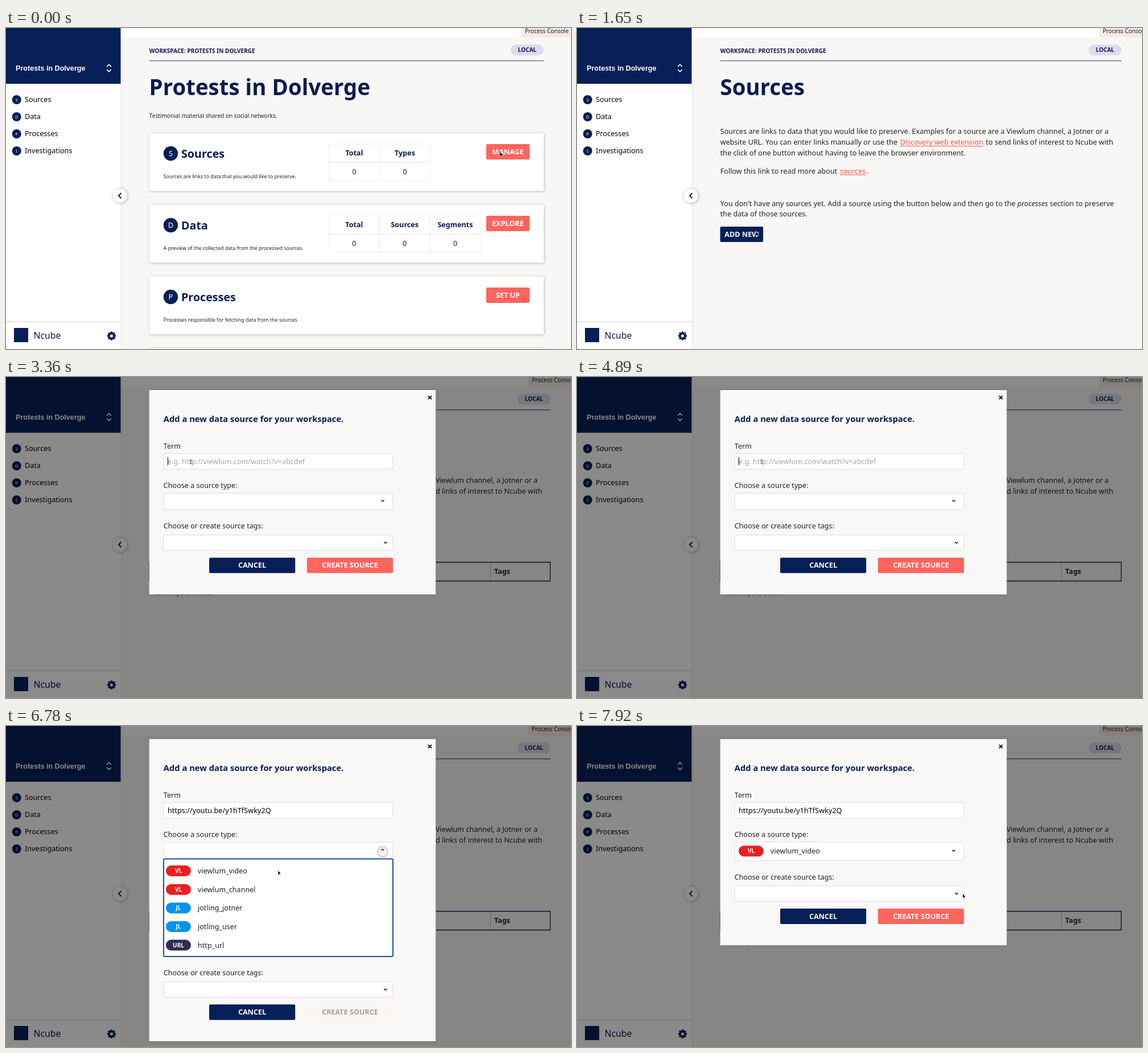
Animation, 993 px wide and 564 px high, one loop 8000 ms. Source, as an HTML page with a canvas:

```html
<!DOCTYPE html>
<html lang="en">
<head>
<meta charset="utf-8">
<title>Workspace</title>
<style>
html, body { margin: 0; width: 100%; height: 100%; overflow: hidden; background: #f9f7f5; }
canvas { display: block; width: 993px; height: 564px; }
</style>
</head>
<body>
<canvas id="stage"></canvas>
<script>
const W = 993, H = 564, LOOP = 8000;
const NAVY = '#071f57', INK = '#0b1b52', RED = '#ff645d', PAGE = '#f9f7f5', BODY = '#222226';
const SANS = '"Noto Sans", sans-serif', ARIAL = '"Liberation Sans", Arial, sans-serif';
const REM = 12.6, SMALL = 10.08, TINY = 8.82;

// moments of the story, in ms
const T = { sources: 840, modal: 1800, paste: 5220, open: 6420, pick: 7230 };
const CLICKS = [[800, 868, 219], [1690, 314, 359], [3300, 325, 149], [6390, 662, 221], [7170, 406, 268]];
const CARET = [[3300, 3540], [3990, 4440], [4890, 5220], [5220, 5700]];
const PATH = [
  [0, 868, 217], [1020, 868, 217], [1590, 314, 357], [1800, 314, 357], [2000, 310, 356],
  [2460, 310, 356], [2970, 362, 186], [3120, 362, 186], [3300, 325, 149], [5400, 325, 149],
  [6180, 661, 219], [6450, 661, 219], [6960, 406, 268], [7290, 406, 268],
  [7920, 678, 295], [LOOP, 678, 295]
];
const TYPES = [
  ['VL', '#ea2020', 'viewlum_video'], ['VL', '#ea2020', 'viewlum_channel'],
  ['JL', '#0792ec', 'jotling_jotner'], ['JL', '#0792ec', 'jotling_user'],
  ['URL', '#352a55', 'http_url']
];
const TITLE = 'Protests in Dolverge';
const LINK = 'https://youtu.be/y1hTfSwky2Q';

const canvas = document.getElementById('stage');
const ctx = canvas.getContext('2d');
const dpr = window.devicePixelRatio || 1;
canvas.width = W * dpr;
canvas.height = H * dpr;

// y is the middle of the capitals; returns the right end of the text
function text(str, x, y, size = REM, { color = BODY, style = '', align = 'left', font = SANS } = {}) {
  ctx.font = `${style} ${size}px ${font}`;
  ctx.textAlign = align;
  ctx.fillStyle = color;
  ctx.fillText(str, x, y + size * 0.357);
  return x + ctx.measureText(str).width;
}
const bold = (str, x, y, size, color = INK, align = 'left') =>
  text(str, x, y, size, { color, style: 'bold', align });

function rect(x, y, w, h, color) {
  ctx.fillStyle = color;
  ctx.fillRect(x, y, w, h);
}

function box(x, y, w, h, { r = 0, fill, stroke, line = 1, shadow }) {
  ctx.save();
  ctx.beginPath();
  ctx.roundRect(x, y, w, h, r);
  if (shadow) {
    ctx.shadowColor = shadow;
    ctx.shadowBlur = 5 * dpr;
    ctx.shadowOffsetX = dpr;
    ctx.shadowOffsetY = dpr;
  }
  if (fill) { ctx.fillStyle = fill; ctx.fill(); }
  ctx.shadowColor = 'transparent';
  if (stroke) { ctx.strokeStyle = stroke; ctx.lineWidth = line; ctx.stroke(); }
  ctx.restore();
}

function disc(x, y, r, color) {
  ctx.beginPath();
  ctx.arc(x, y, r, 0, Math.PI * 2);
  ctx.fillStyle = color;
  ctx.fill();
}

function lines(points, color, width) {
  ctx.beginPath();
  points.forEach(([x, y], i) => i ? ctx.lineTo(x, y) : ctx.moveTo(x, y));
  ctx.strokeStyle = color;
  ctx.lineWidth = width;
  ctx.stroke();
}

// dir 1 points down, -1 points up
const chevron = (x, y, dir, w = 2.6, color = INK, line = 1.5) =>
  lines([[x - w, y - dir * w / 2], [x, y + dir * w / 2], [x + w, y - dir * w / 2]], color, line);

function badge(letter, x, y, r, size) {
  disc(x, y, r, NAVY);
  text(letter, x, y, size, { color: '#fff', align: 'center' });
}

function button(label, x, y, w, h, fill, color = '#fff') {
  box(x, y, w, h, { r: 2, fill });
  bold(label, x + w / 2, y + h / 2, REM, color, 'center');
}

function pill(label, x, y, w, fill, color) {
  box(x, y - 9.5, w, 19, { r: 9.5, fill });
  bold(label, x + w / 2, y, SMALL, color, 'center');
}

function gear(x, y) {
  ctx.save();
  ctx.translate(x, y);
  for (let i = 0; i < 4; i++) {
    box(-1.8, -7.7, 3.6, 15.4, { r: 0.8, fill: NAVY });
    ctx.rotate(Math.PI / 4);
  }
  disc(0, 0, 5.9, NAVY);
  disc(0, 0, 2.6, '#fff');
  ctx.restore();
}

function sidebar() {
  box(0, 0, 201.5, H, { fill: '#fff', shadow: 'rgba(0,0,0,.06)' });
  rect(0, 0, 201.5, 98, NAVY);
  text(TITLE, 17, 70.3, REM, { color: '#fff', style: 'bold', font: ARIAL });
  chevron(181, 66, -1, 3.8, '#fff');
  chevron(181, 75, 1, 3.8, '#fff');
  ['Sources', 'Data', 'Processes', 'Investigations'].forEach((name, i) => {
    const y = 126 + i * 30;
    badge(name[0], 18.7, y, 8, 7.2);
    text(name, 33, y, REM, { color: '#000' });
  });
  rect(0, 515.5, 201.5, 1, '#cfcfd2');
  rect(14, 527, 25, 25, NAVY);
  text('Ncube', 48.5, 540, 15.75, { color: INK });
  gear(185.5, 541);
  box(187, 281.5, 26, 26, { r: 13, fill: '#fff', stroke: '#dedee0', shadow: 'rgba(0,0,0,.25)' });
  lines([[202.5, 290], [198, 294.6], [202.5, 299.2]], INK, 2);
}

function topBar(right) {
  rect(0, 0, W, H, PAGE);
  rect(201, 0, W, 16.5, '#fff');
  rect(right - 39, 0, W, 16.5, '#fae9e1');
  text('Process Console', right - 33, 5.3, SMALL, { color: INK });
  bold('WORKSPACE: ' + TITLE.toUpperCase(), 251.8, 40.7, SMALL);
  pill('LOCAL', right - 58, 38.7, 58, '#dcdcec', INK);
  rect(252, 57.2, right - 252, 1, '#28386c');
}

function card(y, name, note, action, columns, colW) {
  box(252, y, 693, 101, { fill: '#fff', shadow: 'rgba(0,0,0,.24)' });
  if (!name) return;
  badge(name[0], 289.5, y + 35.5, 12.7, 13);
  bold(name, 308, y + 36.3, 19.7);
  text(note, 276.8, y + 76, TINY);
  columns.forEach((head, i) => {
    const x = 567.5 + i * colW, mid = x + colW / 2;
    box(x, y + 19, colW, 32, { stroke: '#ececec' });
    box(x, y + 51, colW, 32, { stroke: '#ececec' });
    bold(head, mid, y + 35, REM, INK, 'center');
    text('0', mid, y + 67.5, REM, { color: INK, align: 'center' });
  });
  button(action, 844, y + 19, 76, 27, RED);
}

function dashboard() {
  topBar(945);
  bold(TITLE, 251.6, 104, 38.45);
  text('Testimonial material shared on social networks.', 251.8, 154.7, SMALL);
  card(185, 'Sources', 'Sources are links to data that you would like to preserve.', 'MANAGE', ['Total', 'Types'], 89);
  card(311, 'Data', 'A preview of the collected data from the processed sources.', 'EXPLORE', ['Total', 'Sources', 'Segments'], 88.8);
  card(437, 'Processes', 'Processes responsible for fetching data from the sources.', 'SET UP', []);
  card(563);
}

function linkText(str, x, y) {
  const start = x + 1.5;
  const end = text(str, start, y, REM, { color: '#f5524c' });
  rect(start, y + 6, end - start, 1, '#f5524c');
  return end + 1.5;
}

function sourcesPage(list) {
  topBar(957);
  bold('Sources', 251.6, 104, 38.45);
  text('Sources are links to data that you would like to preserve. Examples for a source are a Viewlum channel, a Jotner or a', 251.8, 182);
  let x = text('website URL. You can enter links manually or use the ', 251.8, 201);
  x = linkText('Discovery web extension', x, 201);
  text(' to send links of interest to Ncube with', x, 201);
  text('the click of one button without having to leave the browser environment.', 251.8, 220);
  x = text('Follow this link to read more about ', 251.8, 251.5);
  text('.', linkText('sources', x, 251.5), 251.5);
  if (list) {
    box(252, 325.5, 704.5, 33, { stroke: NAVY, line: 1.3 });
    rect(851, 326, 1, 32, '#b9b9c4');
    bold('Tags', 858, 342, REM, BODY);
    text('Showing 0 of 0 items', 264, 379.5, SMALL, { color: '#77777c' });
  } else {
    x = text("You don't have any sources yet. Add a source using the button below and then go to the ", 251.8, 308.5);
    x = text('processes', x, 308.5, REM, { style: 'italic' });
    text(' section to preserve', x, 308.5);
    text('the data of those sources.', 251.8, 327);
    button('ADD NEW', 251.6, 349, 75.6, 27, NAVY);
  }
}

function typeRow([code, color, name], x, y) {
  pill(code, x, y, 44, color, '#fff');
  text(name, x + 56, y);
}

function field(y, h) {
  box(277.2, y, 402.5, h, { r: 1, fill: '#fff', stroke: '#dcdce6' });
}

function modal(t) {
  const pasted = t >= T.paste, picked = t >= T.pick, open = t >= T.open && !picked;
  const shift = open ? 171.8 : picked ? 3.3 : 0;
  rect(0, 0, W, H, 'rgba(0,0,0,.46)');
  box(251.7, 23, 503.6, 359 + shift, { fill: '#f9f8f7', shadow: 'rgba(0,0,0,.12)' });
  bold('Add a new data source for your workspace.', 276.8, 74, 14.74);
  lines([[742, 33], [748, 39]], INK, 1.8);
  lines([[748, 33], [742, 39]], INK, 1.8);

  text('Term', 276.8, 121.5);
  field(134.5, 27.5);
  let end = 284;
  if (pasted) end = text(LINK, 284, 148.2, 12.7, { color: '#000' }) + 0.5;
  else text('e.g. http://viewlum.com/watch?v=abcdef', 284, 148.2, 12.7, { color: '#a6a6a6' });
  if (CARET.some(([a, b]) => t >= a && t < b)) rect(end, 141, 1, 14, '#000');

  text('Choose a source type:', 276.8, 190.8);
  field(204, picked ? 32.3 : 29);
  if (picked) typeRow(TYPES[0], 284, 219.8);
  chevron(662, picked ? 219 : 217.5, open ? -1 : 1);

  text('Choose or create source tags:', 276.8, 261.8 + shift);
  field(277.7 + shift, 27);
  chevron(667, 291 + shift, 1);
  button('CANCEL', 357.1, 317.4 + shift, 151.2, 27.2, NAVY);
  const off = pasted && !picked;
  button('CREATE SOURCE', 528.9, 317.4 + shift, 151.2, 27.2, off ? '#fcf5f3' : RED, off ? '#a09ea0' : '#fff');

  if (open) {
    box(277, 233.5, 403, 171.5, { r: 2, fill: '#fff', stroke: '#1050b4', line: 2 });
    TYPES.forEach((row, i) => typeRow(row, 281, 254.5 + i * 32.65));
  }
}

function pointerAt(t) {
  const i = PATH.findIndex(([time]) => time > t);
  const [t0, x0, y0] = PATH[i - 1], [t1, x1, y1] = PATH[i];
  const p = (t - t0) / (t1 - t0), e = p * p * (3 - 2 * p);
  return [x0 + (x1 - x0) * e, y0 + (y1 - y0) * e];
}

const SHAPES = {
  arrow: 'M0 0V6.6L1.5 5.3L2.6 7.7L3.7 7.2L2.7 4.9H4.7Z',
  hand: 'M0 0.6Q.7 -.4 1.4 .6V3L4.6 3.7Q5.2 4 5 5L4.3 7.6H.8L-1.5 4.6Q-1.4 3.6 0 4.4Z',
  beam: 'M-1.6 -3.6Q0 -3.6 0 -2.6Q0 -3.6 1.6 -3.6M0 -2.6V2.8M-1.6 3.8Q0 3.8 0 2.8Q0 3.8 1.6 3.8'
};

function pointer(t) {
  const [x, y] = pointerAt(t);
  const overButton = t < T.sources || (t > 1540 && t < T.modal);
  const inField = t >= T.modal && y > 134 && y < 162 && x > 277 && x < 680;
  const shape = overButton ? 'hand' : inField ? 'beam' : 'arrow';
  const path = new Path2D(SHAPES[shape]);
  ctx.save();
  ctx.translate(x, y);
  if (shape === 'beam') {
    ctx.strokeStyle = '#444';
    ctx.lineWidth = 0.9;
    ctx.stroke(path);
  } else {
    ctx.strokeStyle = '#fff';
    ctx.lineWidth = 1.2;
    ctx.stroke(path);
    ctx.fillStyle = '#151520';
    ctx.fill(path);
  }
  ctx.restore();
}

function clickRings(t) {
  for (const [start, x, y] of CLICKS) {
    const p = (t - start) / 420;
    if (p < 0 || p > 1) continue;
    ctx.save();
    ctx.globalAlpha = 0.25 + 0.5 * p;
    ctx.beginPath();
    ctx.arc(x, y, 2 + 7.5 * p, 0, Math.PI * 2);
    ctx.fillStyle = 'rgba(255,150,130,.16)';
    ctx.fill();
    ctx.strokeStyle = '#f58b78';
    ctx.lineWidth = 1.4;
    ctx.stroke();
    ctx.restore();
  }
}

function draw(t) {
  ctx.setTransform(dpr, 0, 0, dpr, 0, 0);
  if (t < T.sources) dashboard();
  else sourcesPage(t >= T.modal);
  sidebar();
  if (t >= T.modal) modal(t);
  clickRings(t);
  pointer(t);
}

const begin = performance.now();
function tick() {
  draw((performance.now() - begin) % LOOP);
  requestAnimationFrame(tick);
}
tick();
</script>
</body>
</html>
```
